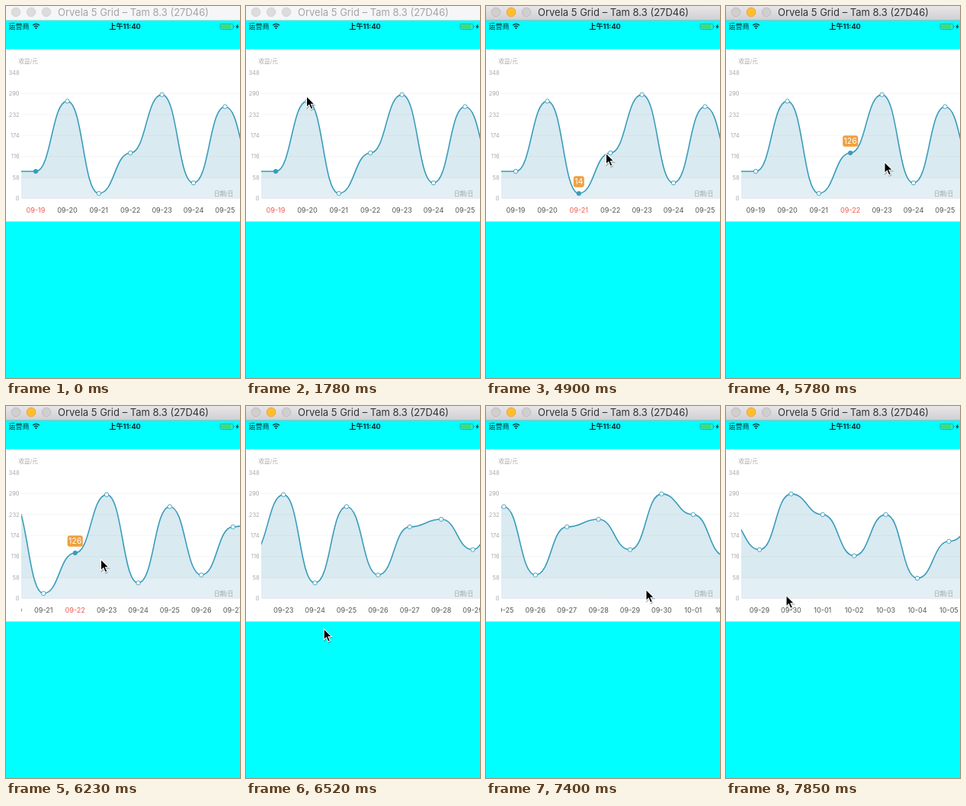
These frames come from a looping animation (307 by 486 pixels, 7.99 s). An HTML page:

```html
<!DOCTYPE html>
<html lang="zh">
<head>
<meta charset="utf-8">
<title>Income chart</title>
<style>
html, body { margin: 0; width: 100%; height: 100%; overflow: hidden; background: #0ff; }
svg { display: block; width: 100vw; height: 100vh; font-family: Inter, "Noto Sans CJK SC", "Noto Sans CJK", sans-serif; }
.axis { font-size: 7.5px; fill: #a9a9a9; }
.date { font-size: 9.1px; text-anchor: middle; }
</style>
</head>
<body>
<svg viewBox="0 0 307 486" preserveAspectRatio="none">
  <defs>
    <linearGradient id="bar" x2="0" y2="1">
      <stop offset="0" stop-color="#e8e6e8"/><stop offset="1" stop-color="#d0ced0"/>
    </linearGradient>
    <linearGradient id="area" gradientUnits="userSpaceOnUse" x1="0" y1="114" x2="0" y2="252">
      <stop offset=".79" stop-color="#d9eaf1"/><stop offset=".81" stop-color="#e2eff4"/>
    </linearGradient>
    <clipPath id="plot"><rect x="20" y="57" width="287" height="224"/></clipPath>
    <path id="arrow" d="M0 0V15.6L3.6 12.2 6.2 18.2 9 17 6.4 11.1H11.2Z"/>
  </defs>
  <rect width="307" height="486" fill="#0ff"/>

  <rect id="titleBar" width="307" height="19"/>
  <rect id="titleEdge" y="18" width="307" height="1"/>
  <g id="lights" stroke-width=".8"></g>
  <text id="title" x="68" y="13" font-size="13">Orvela 5 Grid – Tam 8.3 (27D46)</text>

  <g fill="#062a2a">
    <text x="3.5" y="30.3" font-size="9">运营商</text>
    <text x="156" y="30.3" font-size="9.1" font-weight="700" text-anchor="middle">上午11:40</text>
    <circle cx="39.5" cy="29" r="1.1"/>
    <path d="M35.2 25.2Q39.5 21.6 43.8 25.2M37.1 27.2Q39.5 25.2 41.9 27.2" fill="none" stroke="#062a2a" stroke-width="1.3"/>
    <rect x="281" y="23.3" width="17" height="7.2" rx="1.6" fill="none" stroke="#3a8f8f" stroke-width=".7"/>
    <rect x="282" y="24.3" width="13" height="5.2" rx=".8" fill="#4cd964"/>
    <path d="M298.7 25.6q1.2 1.3 0 2.6zM304.6 23.2l-3.4 4.2h2.1l-.9 3.2 3.4-4.2h-2.1z"/>
  </g>

  <rect y="56.5" width="307" height="225" fill="#fff"/>
  <g clip-path="url(#plot)">
    <g id="chart">
      <path id="fill" fill="url(#area)"/>
      <path id="line" fill="none" stroke="#3a9cba" stroke-width="1.6"/>
    </g>
  </g>
  <g id="grid"></g>
  <g clip-path="url(#plot)"><g id="marks"></g></g>
  <text class="axis" x="16.5" y="74.6">收益/元</text>
  <text class="axis" x="273" y="248" style="fill:#96a3a8">日期/日</text>

  <g id="cursor">
    <use href="#arrow" x=".6" y="1.4" opacity=".25" stroke="#000" stroke-width="1.4"/>
    <use href="#arrow" stroke="#fff" stroke-width="1.1"/>
  </g>
</svg>
<script>
const LOOP = 7990, TICKS = 54;
const BASE = 251.5, SCALE = 0.4727, FIRST = 39, STEP = 41.4;
const values = [75, 269, 14, 126, 287, 43, 254, 65, 198, 219, 135, 289, 232, 118, 232, 56, 158, 215];

// Each move: first tick, last tick, then where it ends
const pointerMoves = [
  [3, 12, 79.5, 118], [12, 16, 78.5, 123], [23, 30, 118, 240], [30, 33, 157.5, 192.5],
  [37, 39, 208, 204], [40, 42, 124.5, 200.5], [42, 46, 88.5, 346.5],
  [46, 48, 178, 305], [48, 50, 210, 240], [51, 53, 79, 247.5]
];
// Drag, glide, drag
const scrollMoves = [[40, 42, 72.5], [42, 48, 264], [51, 53, 409]];
const CLICKS = [21, 30, 36];

const $ = id => document.getElementById(id);
const px = i => FIRST + i * STEP;
const py = v => BASE - v * SCALE;
const easeOut = f => 1 - (1 - f) ** 1.4;

function follow(start, moves, tick) {
  let pos = start;
  for (const [from, to, ...end] of moves) {
    if (tick <= from) break;
    const f = easeOut(Math.min(1, (tick - from) / (to - from)));
    pos = pos.map((p, i) => p + (end[i] - p) * f);
  }
  return pos;
}

function add(parent, tag, attrs, text = '') {
  const el = document.createElementNS('http://www.w3.org/2000/svg', tag);
  for (const k in attrs) el.setAttribute(k, attrs[k]);
  el.textContent = text;
  return parent.appendChild(el);
}

function dateLabel(i) {
  const day = 19 + i;
  return day > 30 ? '10-' + String(day - 30).padStart(2, '0') : '09-' + day;
}

const lights = [13, 33, 53].map(cx => add($('lights'), 'circle', { cx, cy: 8, r: 5.8 }));

for (let v = 0; v <= 348; v += 58) {
  const y = py(v);
  add($('grid'), 'text', { class: 'axis', x: 17.6, y: y + 2.7, 'text-anchor': 'end' }, v);
  if (v < 348) add($('grid'), 'path', { d: `M20 ${y}H307`, stroke: '#000', 'stroke-opacity': .06, 'stroke-width': .8 });
}

let curve = `M-30 ${py(values[0])}H${px(0)}`;
for (let i = 1; i < values.length; i++) {
  const mid = px(i - .5), y = py(values[i]);
  curve += `C${mid} ${py(values[i - 1])} ${mid} ${y} ${px(i)} ${y}`;
}
$('line').setAttribute('d', curve);
$('fill').setAttribute('d', `${curve}V${BASE}H-30Z`);

const marks = $('marks');
const points = values.map((v, i) => ({
  dot: add(marks, 'circle', { cx: px(i), cy: py(v), r: 2.7, stroke: '#3a9cba', 'stroke-width': .9 }),
  label: add(marks, 'text', { class: 'date', x: px(i), y: 269.8 }, dateLabel(i))
}));

const tip = add(marks, 'g', {});
const tipBox = add(tip, 'rect', { y: -22.7, height: 14.6, rx: 3, fill: '#f0a040' });
const tipText = add(tip, 'text', { y: -11.6, 'font-size': 10.6, fill: '#fff', 'text-anchor': 'middle' });

function select(index) {
  points.forEach(({ dot, label }, i) => {
    dot.setAttribute('fill', i === index ? '#3a9cba' : '#fff');
    label.setAttribute('fill', i === index ? '#f05a50' : '#555');
  });
  tip.style.display = index ? '' : 'none';
  if (!index) return;
  tipText.textContent = values[index];
  const w = tipText.getComputedTextLength() + 2.8;
  tipBox.setAttribute('x', -w / 2);
  tipBox.setAttribute('width', w);
  tip.setAttribute('transform', `translate(${px(index)} ${py(values[index])})`);
}

function setWindow(active) {
  $('titleBar').setAttribute('fill', active ? 'url(#bar)' : '#f6f6f6');
  $('titleEdge').setAttribute('fill', active ? '#b4b2b4' : '#d6d6d6');
  $('title').setAttribute('fill', active ? '#333' : '#a4a4a4');
  lights.forEach((c, i) => {
    const on = active && i === 1;
    c.setAttribute('fill', on ? '#fdbe2e' : active ? '#d0ced0' : '#dcdcdc');
    c.setAttribute('stroke', on ? '#dfa023' : active ? '#b9b7b9' : '#cfcfcf');
  });
}

function draw(time) {
  const tick = Math.min(TICKS - 1, Math.floor((time % LOOP + 5) * TICKS / LOOP));
  const [x, y] = follow([272, 474], pointerMoves, tick);
  const shift = `translate(${-follow([0], scrollMoves, tick)[0]} 0)`;
  $('cursor').style.display = tick < 3 ? 'none' : '';
  $('cursor').setAttribute('transform', `translate(${x} ${y}) scale(.92)`);
  $('chart').setAttribute('transform', shift);
  marks.setAttribute('transform', shift);

  // Every click picks the next point
  const picked = CLICKS.filter(c => tick >= c).length;
  setWindow(picked > 0);
  select(picked);
}

function frame() {
  draw(performance.now());
  requestAnimationFrame(frame);
}
frame();
</script>
</body>
</html>
```
